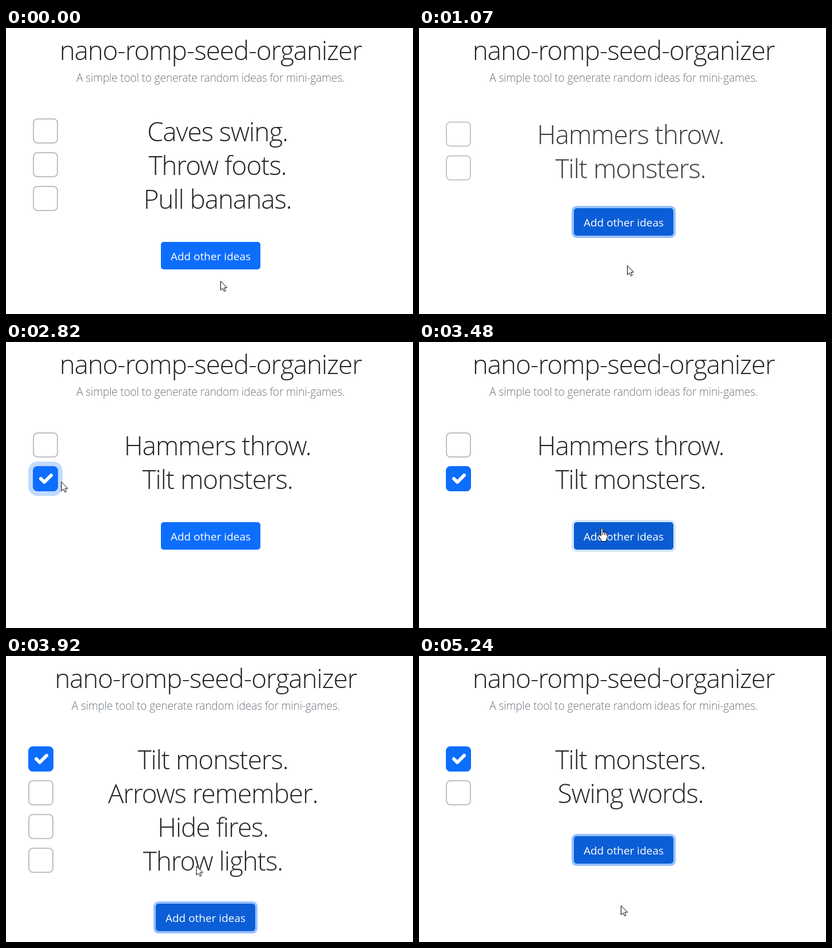
Recreate the animation shown at these times as an HTML page. Size 712 by 500 pixels, loop 5.68 s.

```html
<!DOCTYPE html>
<html lang="en">
<head>
<meta charset="utf-8">
<title>Idea list</title>
<style>
  html, body { margin: 0; width: 100%; height: 100%; overflow: hidden; background: #fff; }
  svg { display: block; width: 712px; height: 500px; }

  text { font-family: "Open Sans", "Noto Sans", sans-serif; font-weight: 300; text-anchor: middle; fill: #212529; }
  .big { font-size: 46px; letter-spacing: -1.15px; }
  .lead { font-size: 19.3px; letter-spacing: -.2px; fill: #6c757d; }
  .label { font-size: 19px; font-weight: 400; fill: #fff; }
  .box { fill: #fff; stroke: #bfbfbf; stroke-width: 2; }
  .checked { fill: #0d6efd; stroke: #0d6efd; stroke-width: 2; }
  .tick { fill: none; stroke: #fff; stroke-width: 6; stroke-linecap: round; stroke-linejoin: round; }
  .halo { fill: none; stroke: #0d6efd; stroke-opacity: .25; stroke-width: 8; }
  .ring { fill: none; stroke: #3184fd; stroke-opacity: .5; stroke-width: 4; }
  .pointer { fill: #fff; stroke: #000; stroke-linejoin: round; }

  /* every part shares one 5680 ms clock */
  .anim { animation: 5680ms linear infinite; }
  .step { animation-timing-function: step-end; }
  .head { animation-name: head; }
  .first { animation-name: first; }
  .second { animation-name: second; }
  .third { animation-name: third; }
  .fourth { animation-name: fourth; }
  .kept { animation-name: kept; }
  .moved { animation-name: moved; }
  .on { animation-name: on; }
  .halo { animation-name: halo; }
  .button { animation-name: button; }
  .face { animation-name: face; }
  .ring { animation-name: ring; }
  .cursor { animation-name: cursor; animation-timing-function: ease-in-out; }
  .arrow { animation-name: arrow; }
  .hand { animation-name: hand; }

  /* the scrollbar pushes the page to the left */
  @keyframes head {
    0% { transform: none; }
    63.011% { transform: translateX(-8.5px); }
    85.563%, 100% { transform: none; }
  }
  @keyframes button {
    0% { transform: none; }
    15.176% { transform: translateY(-59px); }
    63.011% { transform: translate(-9px, 59px); }
    85.563%, 100% { transform: translateY(-59px); }
  }

  /* new ideas fly up with a cubic ease-out */
  @keyframes first {
    0% { opacity: 1; }
    15.176%, 100% { opacity: 0; }
  }
  @keyframes second {
    0% { opacity: 0; transform: translateY(50px); animation-timing-function: step-end; }
    15.176% { opacity: 0; transform: translateY(50px); animation-timing-function: cubic-bezier(.333, 1, .667, 1); }
    22.218% { opacity: 1; transform: none; animation-timing-function: step-end; }
    63.011%, 100% { opacity: 0; transform: none; }
  }
  @keyframes kept {
    0% { opacity: 0; transform: translateY(50px); animation-timing-function: step-end; }
    15.176% { opacity: 0; transform: translateY(50px); animation-timing-function: cubic-bezier(.333, 1, .667, 1); }
    22.218%, 100% { opacity: 1; transform: none; }
  }
  @keyframes third {
    0% { opacity: 0; transform: translate(-8px, 50px); animation-timing-function: step-end; }
    63.011% { opacity: 0; transform: translate(-8px, 50px); animation-timing-function: cubic-bezier(.333, 1, .667, 1); }
    70.053% { opacity: 1; transform: translate(-8px, 0); animation-timing-function: step-end; }
    85.563%, 100% { opacity: 0; transform: translate(-8px, 0); }
  }
  @keyframes fourth {
    0% { opacity: 0; transform: translateY(50px); animation-timing-function: step-end; }
    85.563% { opacity: 0; transform: translateY(50px); animation-timing-function: cubic-bezier(.333, 1, .667, 1); }
    92.606%, 100% { opacity: 1; transform: none; }
  }
  @keyframes moved {
    0% { transform: translateY(59px); }
    63.011% { transform: translateX(-8px); }
    85.563%, 100% { transform: none; }
  }

  @keyframes on {
    0% { opacity: 0; }
    45.951%, 100% { opacity: 1; }
  }
  @keyframes halo {
    0% { opacity: 0; }
    44.542% { opacity: 1; }
    60.211%, 100% { opacity: 0; }
  }
  @keyframes face {
    0%, 7.042% { fill: #0d6efd; }
    9.683%, 13.38% { fill: #0b5ed7; }
    15.176% { fill: #0a5ace; }
    17.782%, 44.542% { fill: #0b5ed7; }
    47.183%, 56.514% { fill: #0d6efd; }
    59.155%, 60.211% { fill: #0b5ed7; }
    62.852% { fill: #0a58ca; }
    65.651%, 84.859% { fill: #0b5ed7; }
    85.563% { fill: #0a5cd2; }
    88.204%, 100% { fill: #0b5ed7; }
  }
  @keyframes ring {
    0%, 13.38% { opacity: 0; }
    16.021%, 44.542% { opacity: 1; }
    47.183%, 60.211% { opacity: 0; }
    62.852%, 100% { opacity: 1; }
  }

  @keyframes cursor {
    0%, 1.232% { transform: translate(375px, 442px); }
    8.451%, 23.944% { transform: translate(364px, 415px); }
    29.754%, 34.507% { transform: translate(334px, 347px); }
    41.549%, 49.472% { transform: translate(65px, 221px); }
    49.648% { transform: translate(96px, 244px); animation-timing-function: cubic-bezier(.3, .3, .6, 1); }
    58.803%, 66.549% { transform: translate(320px, 325px); }
    69.718%, 70.423% { transform: translate(334px, 371px); }
    72.711%, 76.056% { transform: translate(344px, 414px); }
    78.873%, 81.69% { transform: translate(352px, 434px); }
    82.218%, 84.859% { transform: translate(355px, 436px); }
    86.972%, 100% { transform: translate(353px, 436px); }
  }
  @keyframes hand {
    0%, 16.549%, 36.62%, 64.789%, 86.972%, 100% { opacity: 0; }
    5.986%, 27.817%, 56.514%, 78.7% { opacity: 1; }
  }
  @keyframes arrow {
    0%, 16.549%, 36.62%, 64.789%, 86.972%, 100% { opacity: 1; }
    5.986%, 27.817%, 56.514%, 78.7% { opacity: 0; }
  }
</style>
</head>
<body>
<svg viewBox="0 0 712 500">
  <defs>
    <rect id="box" class="box" x="48" y="159" width="42" height="42" rx="7"/>
  </defs>

  <g class="anim step head">
    <text class="big" x="358" y="56">nano-romp-seed-organizer</text>
    <text class="lead" x="358" y="94">A simple tool to generate random ideas for mini-games.</text>
  </g>

  <g class="anim step first">
    <use href="#box"/><text class="big" x="370" y="198">Caves swing.</text>
    <use href="#box" y="59"/><text class="big" x="370" y="257">Throw foots.</text>
    <use href="#box" y="118"/><text class="big" x="370" y="316">Pull bananas.</text>
  </g>

  <g class="anim second">
    <use href="#box"/><text class="big" x="370" y="198">Hammers throw.</text>
  </g>

  <g class="anim kept">
    <g class="anim step moved">
      <rect class="anim step halo" x="43" y="154" width="52" height="52" rx="12"/>
      <use href="#box"/>
      <g class="anim step on">
        <rect class="checked" x="48" y="159" width="42" height="42" rx="7"/>
        <path class="tick" d="M61 180l6 6 12-12"/>
      </g>
      <text class="big" x="370" y="198">Tilt monsters.</text>
    </g>
  </g>

  <g class="anim third">
    <use href="#box" y="59"/><text class="big" x="370" y="257">Arrows remember.</text>
    <use href="#box" y="118"/><text class="big" x="370" y="316">Hide fires.</text>
    <use href="#box" y="177"/><text class="big" x="370" y="375">Throw lights.</text>
  </g>

  <g class="anim fourth">
    <use href="#box" y="59"/><text class="big" x="370" y="257">Swing words.</text>
  </g>

  <g class="anim step button">
    <rect class="anim ring" x="269" y="372" width="178" height="52" rx="6.8"/>
    <rect class="anim face" x="271" y="374" width="174" height="48" rx="4.8"/>
    <text class="label" x="358" y="406">Add other ideas</text>
  </g>

  <g class="anim cursor">
    <path class="pointer anim step arrow" d="M.5 .5V16.5L4.2 13 6.6 18.5 9.2 17.4 6.8 12H11.8Z"/>
    <g class="pointer anim step hand">
      <path d="M-1.5 14V2Q-1.5 .5 0 .5T1.5 2V8Q1.5 7 3 7T4.5 8.2Q4.7 7.6 6 7.8T7.3 9.2Q7.6 8.8 8.6 9T9.5 10.5V15.5Q9.5 18 7.8 20.5V23.5H-.8V21.5L-5.6 15Q-7 13 -5.5 12Q-4 11.4 -1.5 14Z"/>
      <path d="M1.5 8V12M4.5 8.5V12.5M7.3 9.5V13"/>
    </g>
  </g>
</svg>
</body>
</html>
```
